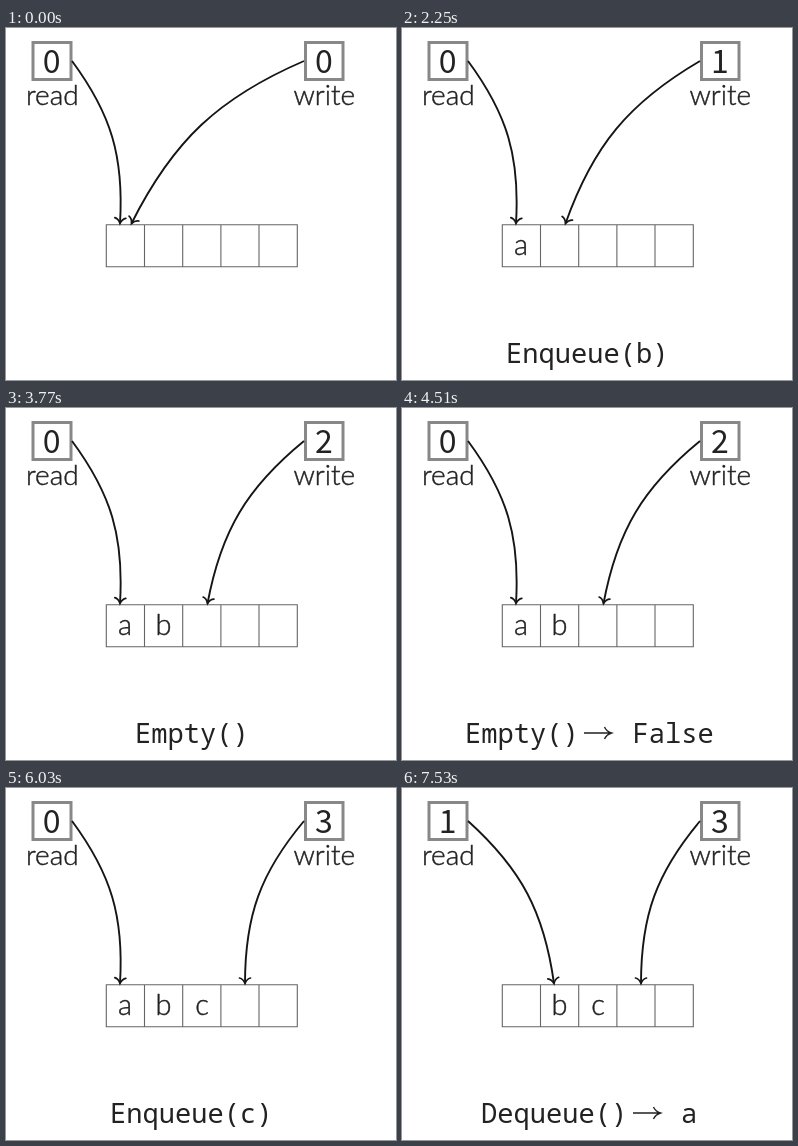
An HTML page for the animation above (8000 ms loop, 390 px wide and 352 px high).

```html
<!DOCTYPE html>
<html lang="en">
<head>
<meta charset="utf-8">
<title>Ring buffer queue</title>
<style>
html, body { margin: 0; width: 100%; height: 100%; overflow: hidden; background: #fff; }
svg { display: block; width: 390px; height: 352px; }
text { fill: #222; stroke: #222; stroke-width: .45; text-anchor: middle; font: 300 28px Lato, "Open Sans", sans-serif; }
.num { font: 300 32px "Noto Sans CJK JP", "Noto Sans CJK SC", Lato, sans-serif; stroke: none; }
.item { font-size: 29px; }
.call { font-size: 30px; letter-spacing: .4px; }
.code { font: 300 27.1px "Noto Sans Mono", "Liberation Mono", monospace; text-anchor: start; stroke: none; }
.frame { fill: none; stroke: #888; stroke-width: 3; }
.cells { fill: none; stroke: #666; stroke-width: 1.1; }
.link { fill: none; stroke: #151515; stroke-width: 1.9; marker-end: url(#tip); }
.gives { fill: none; stroke: #222; stroke-width: 1.4; }

.step { visibility: hidden; animation: 8s step-end infinite; }
.read0 { animation-name: read0; }
.read1 { animation-name: read1; }
.write0 { animation-name: write0; }
.write1 { animation-name: write1; }
.write2 { animation-name: write2; }
.write3 { animation-name: write3; }
.a { animation-name: a; }
.b { animation-name: b; }
.put-a { animation-name: put-a; }
.put-b { animation-name: put-b; }
.empty { animation-name: empty; }
.is-empty { animation-name: is-empty; }
.put-c { animation-name: put-c; }
.take { animation-name: take; }

@keyframes read0 { 0% { visibility: visible } 94.125%, 100% { visibility: hidden } }
@keyframes read1 { 0% { visibility: hidden } 94.125%, 100% { visibility: visible } }
@keyframes write0 { 0% { visibility: visible } 18.625%, 100% { visibility: hidden } }
@keyframes write1 { 0% { visibility: hidden } 18.625% { visibility: visible } 37.5%, 100% { visibility: hidden } }
@keyframes write2 { 0% { visibility: hidden } 37.5% { visibility: visible } 75.375%, 100% { visibility: hidden } }
@keyframes write3 { 0% { visibility: hidden } 75.375%, 100% { visibility: visible } }
@keyframes a { 0% { visibility: hidden } 18.625% { visibility: visible } 94.125%, 100% { visibility: hidden } }
@keyframes b { 0% { visibility: hidden } 37.5%, 100% { visibility: visible } }
@keyframes put-a { 0% { visibility: hidden } 9.125% { visibility: visible } 28.125%, 100% { visibility: hidden } }
@keyframes put-b { 0% { visibility: hidden } 28.125% { visibility: visible } 47.125%, 100% { visibility: hidden } }
@keyframes empty { 0% { visibility: hidden } 47.125% { visibility: visible } 56.375%, 100% { visibility: hidden } }
@keyframes is-empty { 0% { visibility: hidden } 56.375% { visibility: visible } 66.125%, 100% { visibility: hidden } }
@keyframes put-c { 0% { visibility: hidden } 66.125% { visibility: visible } 84.875%, 100% { visibility: hidden } }
@keyframes take { 0% { visibility: hidden } 84.875% { visibility: visible } 94.125%, 100% { visibility: hidden } }
</style>
</head>
<body>
<svg viewBox="0 0 390 352">
  <defs>
    <marker id="tip" markerUnits="userSpaceOnUse" markerWidth="16" markerHeight="16" viewBox="-8 -8 16 16" orient="auto">
      <path d="M-5.5 -5.5C-4.8 -2.5 -1 -.4 0 0C-1 .4 -4.8 2.5 -5.5 5.5" fill="none" stroke="#151515" stroke-width="1.7" stroke-linecap="round"/>
    </marker>
    <path id="gives" class="gives" d="M0 0H27M20.5 -6Q22.5 -1.5 27.5 0Q22.5 1.5 20.5 6"/>
  </defs>

  <rect class="frame" x="27" y="14.5" width="38" height="37"/>
  <rect class="frame" x="299.5" y="14.5" width="37.5" height="37"/>
  <text x="46.3" y="77">read</text>
  <text x="318.3" y="77">write</text>
  <path class="cells" d="M100.3 196.7H291.3V238.7H100.3ZM138.5 196.7V238.7M176.7 196.7V238.7M214.9 196.7V238.7M253 196.7V238.7"/>

  <g class="step read0">
    <text class="num" x="45.7" y="44.8">0</text>
    <path class="link" d="M66 33C105.4 86.2 118 129 114 195.5"/>
  </g>
  <g class="step read1">
    <text class="num" x="45.7" y="44.8">1</text>
    <path class="link" d="M66 33C119.3 81.1 142.1 123.9 152 195.5"/>
  </g>

  <g class="step write0">
    <text class="num" x="318" y="44.8">0</text>
    <path class="link" d="M298 33C213 69.6 167.1 112.4 125.5 195.5"/>
  </g>
  <g class="step write1">
    <text class="num" x="318" y="44.8">1</text>
    <path class="link" d="M298 33C227 74.6 191.1 117.5 163.5 195.5"/>
  </g>
  <g class="step write2">
    <text class="num" x="318" y="44.8">2</text>
    <path class="link" d="M298 33C241 79.7 215.1 122.6 201.5 195.5"/>
  </g>
  <g class="step write3">
    <text class="num" x="318" y="44.8">3</text>
    <path class="link" d="M298 33C254.6 84.7 239 127.5 239 195.5"/>
  </g>

  <text class="item step a" x="119" y="227">a</text>
  <text class="item step b" x="157.5" y="227">b</text>
  <text class="item step write3" x="196" y="227">c</text>

  <text class="call step put-a" x="190.5" y="335">Enqueue(a)</text>
  <text class="code step put-b" x="104" y="335">Enqueue(b)</text>
  <text class="code step empty" x="129" y="335">Empty()</text>
  <g class="step is-empty">
    <text class="code" x="63" y="335">Empty()</text>
    <use href="#gives" x="182" y="325"/>
    <text class="code" x="230.5" y="335">False</text>
  </g>
  <text class="code step put-c" x="104" y="335">Enqueue(c)</text>
  <text class="code step take" x="112" y="335">Dequeue()</text>
  <g class="step read1">
    <text class="code" x="79" y="335">Dequeue()</text>
    <use href="#gives" x="231" y="325"/>
    <text class="code" x="279" y="335">a</text>
  </g>
</svg>
</body>
</html>
```
